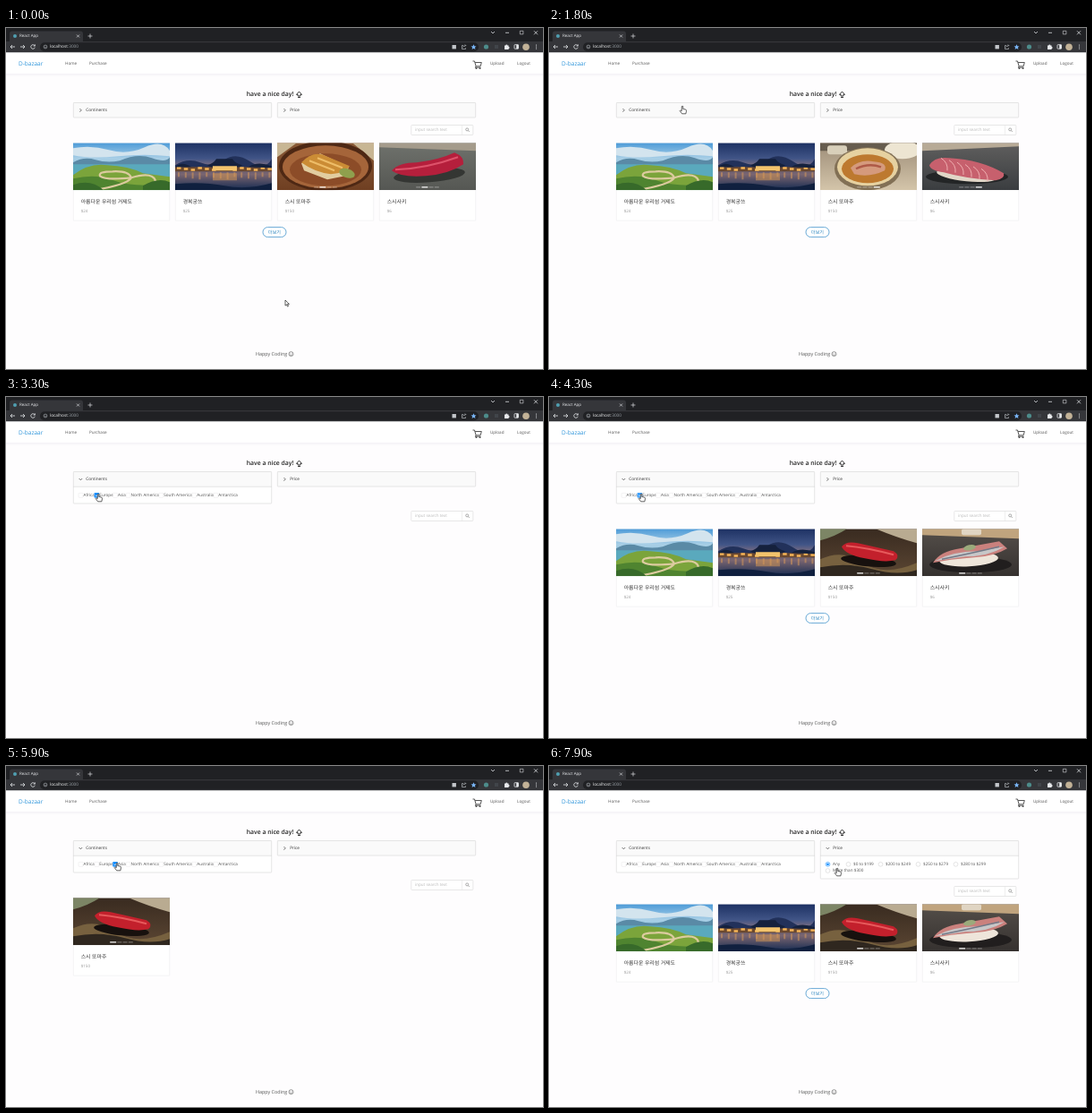
Animation of 600 by 381 pixels, one loop 8000 ms. Source, as an HTML page with a canvas:

```html
<!DOCTYPE html>
<html lang="ko">
<head>
<meta charset="utf-8">
<title>React App</title>
<style>
  html, body { margin: 0; height: 100%; overflow: hidden; background: #fefdfe; }
  canvas { display: block; }
</style>
</head>
<body>
<canvas id="stage" width="600" height="381"></canvas>
<script>
const ctx = document.getElementById('stage').getContext('2d');
const LOOP = 8000;
const FONT = '"Open Sans", "Noto Sans CJK KR", "Noto Sans CJK", sans-serif';
const BLUE = '#1890ff';

const clamp = v => Math.max(0, Math.min(1, v));
const ease = (t, start, length) => {
  const p = clamp((t - start) / length);
  return p * p * (3 - 2 * p);
};

// Drawing helpers
function rect(x, y, w, h, color, radius = 0) {
  ctx.fillStyle = color;
  ctx.beginPath();
  ctx.roundRect(x, y, w, h, radius);
  ctx.fill();
}
function frame(x, y, w, h, color, radius = 0, width = 0.6) {
  ctx.strokeStyle = color;
  ctx.lineWidth = width;
  ctx.beginPath();
  ctx.roundRect(x, y, w, h, radius);
  ctx.stroke();
}
function oval(x, y, rx, ry, color, turn = 0) {
  ctx.fillStyle = color;
  ctx.beginPath();
  ctx.ellipse(x, y, rx, ry, turn, 0, 7);
  ctx.fill();
}
function ring(x, y, r, color, width = 0.6) {
  ctx.strokeStyle = color;
  ctx.lineWidth = width;
  ctx.beginPath();
  ctx.arc(x, y, r, 0, 7);
  ctx.stroke();
}
function shape(path, fill, stroke, width = 0.7, x = 0, y = 0) {
  const p = new Path2D(path);
  ctx.save();
  ctx.translate(x, y);
  ctx.lineWidth = width;
  if (fill) { ctx.fillStyle = fill; ctx.fill(p); }
  if (stroke) { ctx.strokeStyle = stroke; ctx.stroke(p); }
  ctx.restore();
}
function text(str, x, y, size = 4.65, color = '#444', weight = 400, align = 'left') {
  ctx.font = `${weight} ${size}px ${FONT}`;
  ctx.textAlign = align;
  ctx.fillStyle = color;
  ctx.fillText(str, x, y);
}
function gradient(...colors) {
  const g = ctx.createLinearGradient(0, 0, 0, 53);
  colors.forEach((c, i) => g.addColorStop(i / (colors.length - 1), c));
  return g;
}
function backdrop(...colors) {
  rect(0, 0, 108, 53, gradient(...colors));
}

// Photos, each 108 by 53
function coast() {
  backdrop('#4d9bd8', '#a9cfe6', '#6fb3cf', '#3f93a8');
  shape('M0 6Q20 2 40 8T80 5T108 9V15Q80 12 50 15T0 14Z', '#d3e4ee');
  shape('M0 22Q12 15 25 19T52 20Q72 11 88 17T108 16V25H0Z', '#5a8aa6');
  rect(0, 24, 108, 29, '#5aa9bd');
  shape('M0 36Q18 22 38 25Q62 26 78 34L108 38V53H0Z', '#7ba43b');
  shape('M0 40Q25 34 45 42T108 46V53H0Z', '#4f8430');
  shape('M22 53Q60 47 65 39Q62 31 44 32Q28 32 30 37Q36 42 65 39Q88 32 92 42L84 53', null, '#dccb9f', 2.2);
  shape('M0 47Q20 40 34 53H0ZM78 48Q95 38 108 44V53H78Z', '#376a2a');
}
function palace() {
  backdrop('#1d3163', '#415587', '#c58a78', '#233b66');
  shape('M0 25Q14 16 28 22T55 19T84 21T108 18V33H0Z', '#22315a');
  rect(0, 31, 108, 22, gradient('#27416c', '#344e7b', '#7a6570', '#142a51'));
  rect(0, 27, 108, 5, '#6b4930');
  for (let i = 0; i < 14; i++) {
    rect(2 + i * 7.8, 27 + i % 3, 4.5, 2.4, '#f5b557');
    rect(3 + i * 7.8, 33, 2, 5 + i % 4, '#d89b5b88');
  }
  shape('M36 25Q43 23 46 18H64Q67 23 75 25L72 27H39Z', '#15213d');
  rect(42, 26, 27, 5, '#f3c36c');
  shape('M0 27Q8 20 18 27ZM82 27Q92 20 108 26V28Z', '#15213d');
  rect(42, 34, 27, 8, '#d4975588');
  shape('M0 46Q30 43 55 48T108 45V53H0Z', '#10203f');
}
function grilled() {
  backdrop('#8a5a37', '#6f3f22');
  shape('M0 0H22L0 16ZM84 0H108V20Z', '#c8b694');
  oval(54, 26, 52, 28, '#4e2814');
  oval(54, 27, 48, 24, '#a5653a');
  oval(54, 30, 40, 18, '#8c4c28');
  shape('M27 23L48 12L80 27L76 37L56 41L30 31Z', '#e2cda0');
  shape('M27 22Q38 10 50 13L81 26Q76 34 60 35Q42 33 27 22Z', '#cb8c35');
  shape('M36 20L64 31M45 17L73 28', null, '#eebd68', 2);
  oval(78, 34, 9, 5, '#8fa04d', 0.3);
}
function stew() {
  backdrop('#b9a283', '#c8ad88');
  oval(24, 3, 20, 8, '#5e7665');
  oval(24, 2, 15, 5, '#d8d4c0');
  oval(80, 2, 20, 8, '#e4dac5');
  rect(90, 11, 18, 22, '#7c6148');
  oval(54, 30, 38, 23, '#694429');
  oval(54, 28, 35, 20, '#d6b88b');
  oval(54, 30, 30, 15, '#ad7040');
  shape('M34 27Q48 16 68 23Q82 28 70 36Q50 40 36 34Z', '#c77d70');
  shape('M40 28Q52 23 70 29M43 33Q58 29 68 34', null, '#e5aaa0', 2);
}
function broth() {
  backdrop('#9d8d78', '#d4c5aa');
  rect(0, 0, 108, 9, '#665c4e');
  rect(8, 3, 22, 10, '#d8cfba', 3);
  oval(92, 8, 20, 10, '#ede5d2');
  oval(53, 29, 37, 24, '#827055');
  oval(53, 27, 34, 21, '#e6d1a0');
  oval(53, 29, 29, 16, '#bd792f');
  shape('M34 28Q44 18 60 21Q76 22 72 31Q56 39 38 35Z', '#d59a7d');
  shape('M40 29Q54 22 68 27', null, '#ae5a47', 2.4);
}
function tunaBoard() {
  backdrop('#392b20', '#5b4633');
  shape('M0 0H30Q16 9 0 13Z', '#7c8565');
  shape('M62 0H108V16Q86 10 62 0Z', '#b9ab91');
  shape('M0 34Q25 22 48 38T108 38V53H0Z', '#77613f');
  shape('M0 43Q30 37 58 45T108 46V53H0Z', '#2f271f');
  oval(54, 36, 31, 6, '#17110e', 0.1);
  shape('M24 20Q29 13 42 16L82 25Q90 30 84 35Q72 38 50 33Q28 29 24 20Z', '#c3202c');
  shape('M29 19Q52 21 82 29', null, '#e75a5c', 2);
}
function tunaPlate() {
  backdrop('#6f726c', '#555753');
  shape('M0 0H108V9L0 5Z', '#a49b8b');
  oval(56, 36, 40, 8, '#343633', -0.08);
  shape('M14 31Q22 22 42 22Q67 19 84 11Q95 15 94 24Q78 35 52 37Q24 39 14 31Z', '#b51f3c');
  shape('M18 30Q52 29 88 16', null, '#dd526a', 2);
}
function fatty(top, plate, flesh) {
  backdrop(top, plate);
  shape('M0 0H108V4L0 9Z', '#b7aa96');
  oval(50, 38, 46, 8, '#232526');
  oval(50, 36, 34, 7, '#e1d6c7', 0.1);
  shape('M8 25Q14 15 30 17Q66 19 91 34Q93 40 82 42Q48 40 24 33Q9 31 8 25Z', flesh);
  for (let i = 0; i < 6; i++) {
    shape('M0 0Q8 5 7 14', null, '#efafb0', 1, 21 + i * 9, 17 + i * 2.4);
  }
}
function silver() {
  backdrop('#554f4a', '#35312f');
  shape('M0 0H108V11L0 7Z', '#c0a47e');
  rect(44, 0, 22, 7, '#e0d5c3', 2);
  oval(54, 40, 46, 9, '#211e1e');
  oval(52, 34, 33, 8, '#eee5da', -0.05);
  shape('M12 38Q20 25 42 22L86 14L95 22Q80 31 58 32Q30 34 12 38Z', '#ca817d');
  shape('M14 36Q34 25 62 25L92 20Q74 31 48 31Z', '#c7c7c8');
  shape('M22 34Q52 28 86 20', null, '#737987', 1.4);
  oval(53, 21, 7, 3, '#9baa7b', -0.2);
}

const ITEMS = [
  { title: '아름다운 우리섬 거제도', price: '$24', photos: [coast] },
  { title: '경복궁쓰', price: '$25', photos: [palace] },
  { title: '스시 또마주', price: '$150', photos: [tunaBoard, grilled, stew, broth] },
  { title: '스시사키', price: '$6', photos: [silver, tunaPlate,
    () => fatty('#43413d', '#292b29', '#c94c63'),
    () => fatty('#605f5e', '#3a3d40', '#c7606d')] }
];

const CONTINENTS = [['Africa', 86.5], ['Europe', 104.3], ['Asia', 125], ['North America', 139.5],
  ['South America', 176.2], ['Australia', 213.2], ['Antarctica', 237.3]];
const PRICES = [['Any', 317], ['$0 to $199', 340], ['$200 to $249', 376], ['$250 to $279', 418],
  ['$280 to $299', 460], ['More than $300', 317]];

// Time, x and y of the pointer tip
const POINTER = [[0, 312, 304], [100, 312, 304], [600, 318, 300], [900, 318, 300], [1100, 318, 300],
  [1500, 130, 110], [1700, 142, 88], [1800, 149, 87], [2050, 149, 87], [2450, 108, 111],
  [2850, 103, 108], [4500, 103, 108], [5300, 124, 108], [6700, 124, 108], [7150, 333, 96],
  [7400, 333, 96], [7800, 322, 114], [8000, 322, 114]];

function browser() {
  rect(0, 0, 600, 15, '#202124');
  rect(4, 3.5, 82, 14, '#35363a', 3);
  rect(0, 15, 600, 12.5, '#35363a');
  oval(10, 9, 2, 2, '#4f9fb0');
  text('React App', 15, 9.2, 4.5, '#e8eaed');
  shape('M79 7.5l3 3m0-3l-3 3M91.5 9h5m-2.5-2.5v5', null, '#dadce0');
  shape('M542 4l2 2 2-2M558 5.3h4M590 3.3l4 4m0-4l-4 4', null, '#dadce0', 0.8);
  frame(574.3, 3.3, 3.6, 3.6, '#dadce0');
  shape('M10 21H5m2-2l-2 2 2 2M16 21h5m-2-2l2 2-2 2', null, '#e8eaed', 0.8);
  shape('M32 19.7a2.3 2.3 0 1 0 .3 2M32.4 18.4v1.7h-1.7', null, '#e8eaed', 0.8);
  rect(38, 16.2, 490, 10, '#202124', 5);
  ring(44, 21, 1.9, '#bdc1c6');
  shape('M44 20.8v1.3', null, '#bdc1c6');
  text('localhost', 49, 21.2, 4.75, '#f1f3f4');
  text(':3000', 49 + ctx.measureText('localhost').width, 21.2, 4.75, '#9aa0a6');
  rect(498.5, 19, 4.4, 4.4, '#c3c6ca');
  shape('M511 19.5h-1.5v4h4v-1.3M510.8 21.5q.5-2 3-2m-1-1l1 1-1 1', null, '#b5b9be');
  shape('M522.5 18.2l.9 2 2.1.2-1.6 1.4.5 2.1-1.9-1.1-1.9 1.1.5-2.1-1.6-1.4 2.1-.2Z', '#79b5f8');
  oval(536.5, 21, 2.6, 2.6, '#4d8c8b');
  rect(546, 19, 4, 4, '#41454a');
  shape('M557 19.6h1.3a1 1 0 0 1 2 0h1.3v1.5a1 1 0 0 1 0 2v1h-4.6Z', '#e8eaed');
  frame(568, 18.7, 4.5, 4.5, '#e8eaed', 0.5, 0.8);
  rect(570.2, 18.7, 2.3, 4.5, '#e8eaed');
  oval(581, 21.2, 3.8, 3.8, '#c2b297');
  for (const y of [19, 21, 23]) oval(592.5, y, 0.6, 0.6, '#e8eaed');
}

function pageHeader() {
  rect(0, 27.5, 600, 23.5, '#fff');
  rect(0, 51, 600, 0.8, '#ededf0');
  rect(0, 51.8, 600, 2, '#f9f8fa');
  text('D-bazaar', 14, 40.5, 6.5, '#2c94da');
  text('Home', 66, 39.7, 4.6, '#555');
  text('Purchase', 93, 39.7, 4.6, '#555');
  text('Upload', 541, 39.7, 4.6, '#555');
  text('Logout', 571, 39.7, 4.6, '#555');
  shape('M521.5 37h2l1.6 5.8h5l1.2-4.3h-7.2M525 42.8l-.6 1.4h6', null, '#444', 0.9);
  oval(525.4, 45, 0.9, 0.9, '#444');
  oval(529.6, 45, 0.9, 0.9, '#444');
  text('have a nice day!', 268.7, 74.3, 6.85, '#222', 600);
  shape('M327.5 71l3 3.4h-1.6v1.6h-2.8v-1.6h-1.6ZM326 77.5h3', null, '#222', 0.9);
  text('Happy Coding', 279, 364.6, 5.4, '#555');
  ring(318.5, 364.2, 2.5, '#555');
  shape('M317.2 364.8q1.3 1.5 2.6 0M317.4 363.4h.5m1.2 0h.5', null, '#555', 0.6);
}

function panel(x, label, open, height, body) {
  rect(x, 83.5, 222, 16.5 + height * open, '#fff');
  rect(x, 83.5, 222, 16.5, '#fafafa');
  if (open) {
    ctx.save();
    ctx.beginPath();
    ctx.rect(x, 100, 222, height * open);
    ctx.clip();
    ctx.globalAlpha = open;
    body();
    ctx.restore();
    rect(x, 99.8, 222, 0.6, '#d9d9d9');
  }
  frame(x + 0.3, 83.5, 221.4, 16.5 + height * open, '#d6d6d6', 0.6);
  ctx.save();
  ctx.translate(x + 8.4, 91.9);
  ctx.rotate(open * Math.PI / 2);
  shape('M-.9-1.8L.9 0-.9 1.8', null, '#444', 0.75);
  ctx.restore();
  text(label, x + 14.2, 92, 4.7, '#333');
}

function continents(t) {
  const checked = {
    Europe: ease(t, 2800, 100) - ease(t, 4260, 160),
    Asia: ease(t, 5450, 100) - ease(t, 6700, 150)
  };
  for (const [name, x] of CONTINENTS) {
    const on = checked[name] || 0;
    rect(x - 5.4, 107.3, 5, 5, '#fff', 0.6);
    frame(x - 5.4, 107.3, 5, 5, '#e6e4e6', 0.6, 0.5);
    if (on) {
      const alpha = ctx.globalAlpha;
      ctx.globalAlpha *= on;
      rect(x - 5.7, 107, 5.6, 5.6, BLUE, 0.7);
      shape('M-4.2 109.9l1 1 1.8-2.3', null, '#fff', 0.8, x);
      ctx.globalAlpha = alpha;
    }
    text(name, x, 109.9, 4.65, '#555');
  }
}

function prices() {
  PRICES.forEach(([label, x], i) => {
    const y = i < 5 ? 109.8 : 117;
    ring(x - 5.5, y, 2.4, i ? '#d4d4d4' : BLUE);
    if (!i) oval(x - 5.5, y, 1.4, 1.4, BLUE);
    text(label, x, y + 0.1, 4.65, '#555');
  });
}

function search(shift) {
  const y = 108.5 + shift;
  rect(452.5, y, 69.5, 11, '#fff');
  frame(452.8, y, 69, 11, '#d9d9d9', 0.6);
  rect(509.5, y, 0.5, 11, '#e0e0e0');
  text('input search text', 457, y + 5.7, 4.6, '#b9b9b9');
  ring(515.2, y + 4.9, 1.5, '#777');
  shape('M516.3 6l1.4 1.4', null, '#777', 0.7, 0, y);
}

function card({ title, price, photos }, x, y, slide) {
  rect(x, y, 108, 87, '#fff');
  frame(x + 0.3, y + 0.3, 107.4, 86.6, '#ececee');
  ctx.save();
  ctx.beginPath();
  ctx.rect(x, y, 108, 53);
  ctx.clip();
  const count = photos.length;
  const position = count > 1 ? slide : 0;
  const first = Math.floor(position);
  for (const n of [first, first + 1]) {
    ctx.save();
    ctx.translate(x + (n - position) * 108, y);
    ctx.beginPath();
    ctx.rect(0, 0, 108, 53);
    ctx.clip();
    photos[n % count]();
    ctx.restore();
  }
  if (count > 1) {
    const active = Math.round(position) % count;
    let dot = x + 41.2;
    photos.forEach((_, i) => {
      const w = i === active ? 7 : 5;
      rect(dot, y + 49, w, 1.1, i === active ? '#fff' : '#ffffff50');
      dot += w + 1.2;
    });
  }
  ctx.restore();
  text(title, x + 8.7, y + 65.8, 5.9, '#333', 500);
  text(price, x + 8.7, y + 76.6, 4.5, '#999');
}

function listAt(t) {
  if (t >= 2950 && t < 4150) return [];
  if (t >= 5650 && t < 6900) return [ITEMS[2]];
  return ITEMS;
}
function slideAt(t) {
  if (t < 4150) return 1 + ease(t, 200, 300) + ease(t, 1300, 300);
  return t < 5650 ? ease(t, 5000, 300) : 0;
}

function pointer(t) {
  const next = Math.max(1, POINTER.findIndex(k => k[0] > t));
  const [t0, x0, y0] = POINTER[next - 1];
  const [t1, x1, y1] = POINTER[next];
  const p = ease(t, t0, t1 - t0);
  const x = x0 + (x1 - x0) * p, y = y0 + (y1 - y0) * p;
  const hand = t > 1650 && !(t > 6800 && t < 7100);
  shape(hand
    ? 'M-.7.6Q0-.4.8.6V3.5L3 3.9Q4.7 4.2 4.5 5.5L3.9 8.8H-.4L-2.8 5.5Q-2.7 4.3-.7 5.6Z'
    : 'M0 0V6.2L1.5 4.9 2.5 7.2 3.5 6.7 2.5 4.5H4.4Z', '#fff', '#222', 0.7, x, y);
}

function draw(now) {
  const t = now % LOOP;
  const left = ease(t, 2050, 220), right = ease(t, 7230, 260);
  const shift = Math.max(left * 19, right * 26);
  const list = listAt(t);
  ctx.textBaseline = 'middle';
  ctx.textRendering = 'geometricPrecision';
  rect(0, 0, 600, 381, '#fefdfe');
  browser();
  pageHeader();
  panel(75, 'Continents', left, 19, () => continents(t));
  panel(303, 'Price', right, 26, prices);
  search(shift);
  list.forEach((item, i) => card(item, 75 + i * 114, 128.3 + shift, slideAt(t)));
  if (list.length > 1) {
    rect(287, 222.6 + shift, 26, 11, '#fff', 5.5);
    frame(287, 222.6 + shift, 26, 11, '#4595cc', 5.5, 0.8);
    text('더보기', 300, 228.3 + shift, 5.1, '#2580bd', 500, 'center');
  }
  pointer(t);
  requestAnimationFrame(draw);
}
requestAnimationFrame(draw);
</script>
</body>
</html>
```
